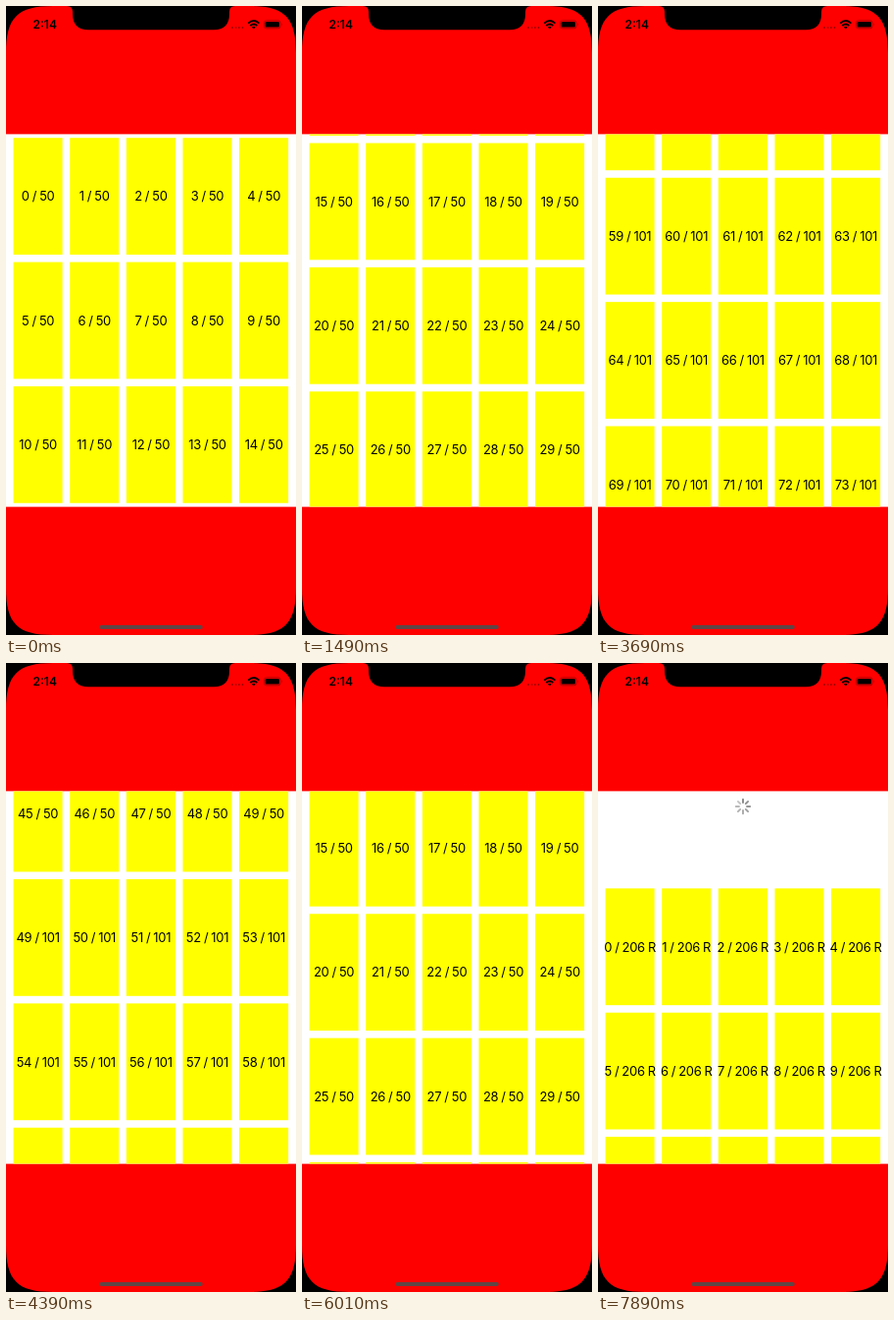
These frames come from a looping animation (296x640 px, 7990 ms). An HTML page:

```html
<!DOCTYPE html>
<html lang="en">
<head>
<meta charset="utf-8">
<title>Grid paging</title>
<style>
  html, body { margin: 0; width: 100%; height: 100%; overflow: hidden; background: #000; }
  svg { display: block; font-family: Inter, sans-serif; }
  #grid text {
    font-size: 13px; letter-spacing: -.3px; word-spacing: -.3px; text-anchor: middle;
  }
</style>
</head>
<body>
<svg width="296" height="640" viewBox="0 0 296 640">
  <clipPath id="viewport"><rect y="130.4" width="296" height="379.2"/></clipPath>
  <rect width="296" height="640" fill="#f00"/>
  <rect y="130.4" width="296" height="379.2" fill="#fff"/>
  <g clip-path="url(#viewport)">
    <g id="spinner" transform="translate(148 146)" stroke="#888" stroke-width="1.9" stroke-linecap="round"></g>
    <g id="grid"></g>
  </g>
  <path fill-rule="evenodd" d="M0 0H296V640H0Z
    M48 0H62Q68 0 68 6V8Q68 24.3 84 24.3H212Q228 24.3 228 8V6Q228 0 234 0H248
    C284.3 0 296 11.7 296 48V592C296 628.3 284.3 640 248 640H48
    C11.7 640 0 628.3 0 592V48C0 11.7 11.7 0 48 0Z"/>
  <text x="27.5" y="23" font-size="12" font-weight="600">2:14</text>
  <g fill="#900">
    <circle cx="231" cy="22" r=".9"/><circle cx="234.5" cy="22" r=".9"/>
    <circle cx="238" cy="22" r=".9"/><circle cx="241.5" cy="22" r=".9"/>
  </g>
  <g fill="none" stroke="#000" stroke-width="1.9">
    <path d="M247.2 17.6Q252.8 12.4 258.4 17.6"/>
    <path d="M249.3 20Q252.8 16.8 256.3 20"/>
  </g>
  <path d="M250.9 21.5Q252.8 20 254.7 21.5L252.8 23.4Z"/>
  <rect x="263.5" y="14.8" width="16.6" height="8" rx="2.2" fill="none" stroke="#900" stroke-width=".8"/>
  <rect x="264.7" y="16" width="14.2" height="5.6" rx="1.2"/>
  <path d="M281 17.3Q282.6 18.8 281 20.3Z" fill="#900"/>
  <rect x="95.3" y="630.1" width="105.4" height="3.8" rx="1.9" fill="#604646"/>
</svg>
<script>
  const LOOP = 7990, REFRESHED = 7770;
  const POINT = 640 / 844;              // pixels per layout point
  const PAGE = 500 * POINT;             // three rows fill one page
  const ROW = PAGE / 3, COLUMN = 76 * POINT, GAP = 10 * POINT;
  const grid = document.getElementById('grid');
  const spinner = document.getElementById('spinner');

  // Swipes: first step, last step, number of steps, page reached
  const swipes = [
    [500, 610, 2, 0.25], [720, 830, 2, 0],
    [1170, 1490, 4, 1], [1870, 2210, 4, 2], [2550, 2980, 5, 3], [3470, 3790, 4, 4],
    [4170, 4510, 4, 3], [4800, 5250, 5, 2], [5580, 6010, 5, 1], [6230, 6670, 5, 0],
    [7080, 7770, 7, -0.251], [7890, 7890, 1, -0.251]
  ];

  // Slow grip, fast flick, long settling tail
  const flick = [[0, 0], [0.2, 0.007], [0.4, 0.29], [0.6, 0.69], [0.75, 0.893], [1, 0.986]];

  function progress(u) {
    const i = Math.max(1, flick.findIndex(([x]) => x >= u));
    const [x0, y0] = flick[i - 1], [x1, y1] = flick[i];
    return y0 + (y1 - y0) * (u - x0) / (x1 - x0);
  }

  function scrollAt(time) {
    let from = 0, page = 0;
    for (const [start, end, steps, to] of swipes) {
      if (time < start) break;
      const interval = (end - start) / (steps - 1) || 1;
      const step = Math.min(steps, Math.floor((time - start + 6) / interval) + 1);
      page = from + (to - from) * progress(step / steps);
      from = to;
    }
    return page * PAGE;
  }

  function add(parent, tag, attributes) {
    const node = document.createElementNS('http://www.w3.org/2000/svg', tag);
    for (const name in attributes) node.setAttribute(name, attributes[name]);
    return parent.appendChild(node);
  }

  const labels = Array.from({ length: 105 }, (_, i) => {
    const width = COLUMN - GAP, height = ROW - GAP;
    const x = GAP + i % 5 * COLUMN;
    const y = 130.4 + GAP / 2 + Math.floor(i / 5) * ROW;
    add(grid, 'rect', { x, y, width, height, fill: '#ff0' });
    return add(grid, 'text', { x: x + width / 2, y: y + height / 2 + 4.8 });
  });

  for (let i = 0; i < 8; i++) {
    add(spinner, 'path', { d: 'M0 -4V-7.2', transform: `rotate(${i * 45})`, opacity: 1 - i * 0.07 });
  }

  function setLabels(refreshed) {
    labels.forEach((label, i) => {
      label.textContent = refreshed ? `${i} / 206 R`
        : i < 50 ? `${i} / 50` : `${i - 1} / 101`;
    });
  }

  let shownRefreshed = null;
  function draw(time) {
    const scroll = scrollAt(time);
    const refreshed = time >= REFRESHED;
    if (refreshed !== shownRefreshed) setLabels(shownRefreshed = refreshed);
    grid.setAttribute('transform', `translate(0 ${-scroll})`);
    spinner.setAttribute('opacity', Math.min(1, Math.max(0, (-scroll - 20) / 60)));
  }

  const origin = performance.now();
  function tick() {
    draw((performance.now() - origin) % LOOP);
    requestAnimationFrame(tick);
  }
  tick();
</script>
</body>
</html>
```
